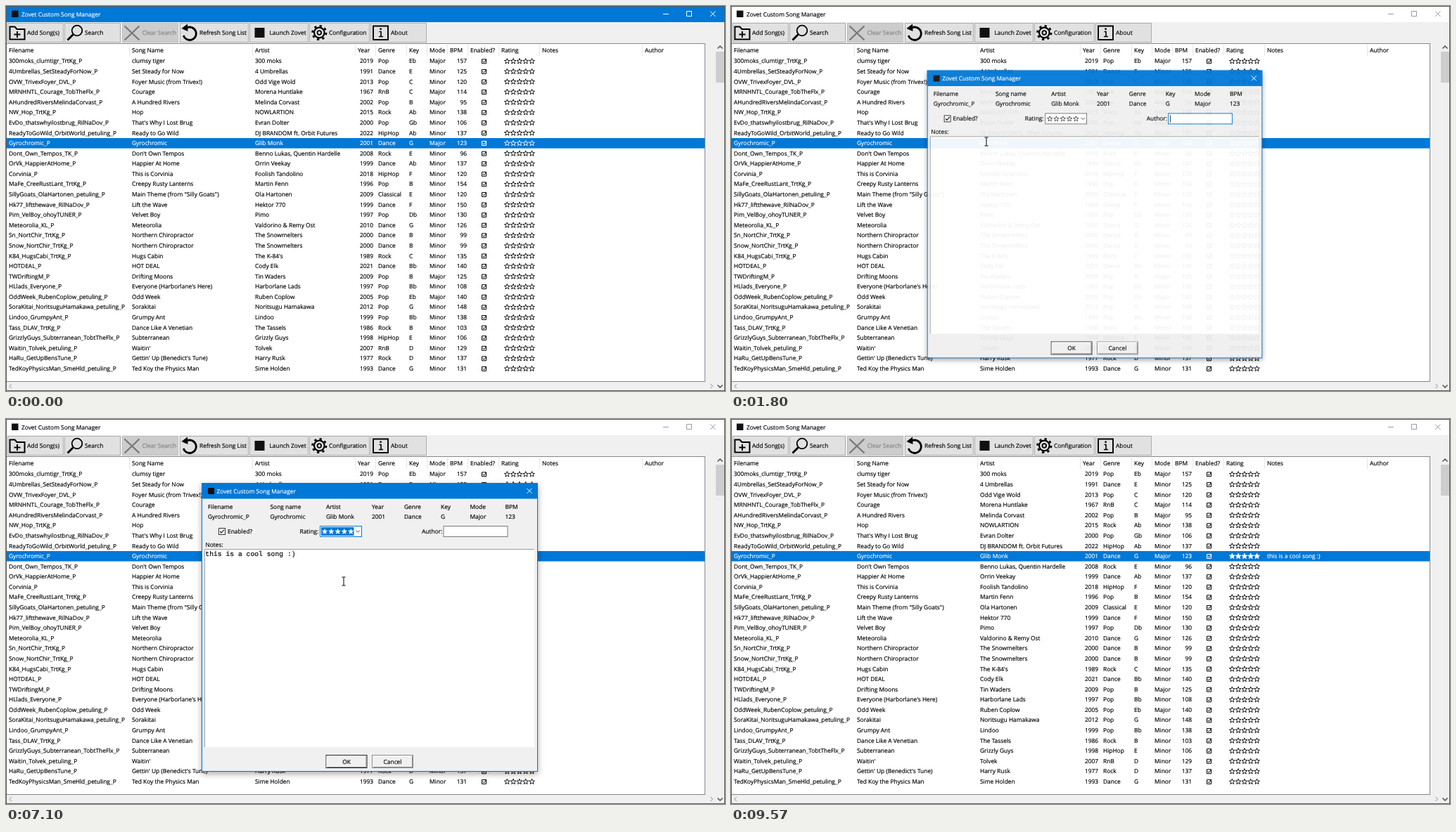
Recreate the animation shown at these times as an HTML page. Size 1022 by 548 pixels, loop 9.71 s.

```html
<!DOCTYPE html>
<html lang="en">
<head>
<meta charset="utf-8">
<title>Custom Song Manager</title>
<style>
  html, body { margin: 0; width: 100%; height: 100%; overflow: hidden; background: #f0f0f0; }
  svg { display: block; width: 100vw; height: 100vh; color: #000; }
  text {
    font: 8.4px "Open Sans", "Noto Sans", sans-serif; white-space: pre; text-rendering: geometricPrecision;
    fill: currentColor; stroke: currentColor; stroke-width: .17px;
  }
  #typed { font: 9.73px "Liberation Mono", monospace; }
  #dialog { filter: drop-shadow(0 3px 4px rgba(0, 0, 0, .35)); transform-origin: 517px 295px; }
</style>
</head>
<body>
<svg id="stage" viewBox="0 0 1022 548"></svg>
<script>
const LOOP = 9710, BLUE = '#0078d7', APP = 'Zovet Custom Song Manager';
const ROW_H = 14.587, PICKED = 8, NOTE = 'this is a cool song :)';

const SONGS = `300moks_clumtigr_TrtKg_P|clumsy tiger|300 moks|2019|Pop|Eb|Major|157
4Umbrellas_SetSteadyForNow_P|Set Steady for Now|4 Umbrellas|1991|Dance|E|Minor|125
OVW_TrivexFoyer_DVL_P|Foyer Music (from Trivex!)|Odd Vige Wold|2013|Pop|C|Minor|120
MRNHNTL_Courage_TobTheFlx_P|Courage|Morena Huntlake|1967|RnB|C|Major|114
AHundredRiversMelindaCorvast_P|A Hundred Rivers|Melinda Corvast|2002|Pop|B|Major|95
NW_Hop_TrtKg_P|Hop|NOWLARTION|2015|Rock|Ab|Minor|138
EvDo_thatswhyilostbrug_RilNaDov_P|That's Why I Lost Brug|Evran Dolter|2000|Pop|Gb|Minor|106
ReadyToGoWild_OrbitWorld_petuling_P|Ready to Go Wild|DJ BRANDOM ft. Orbit Futures|2022|HipHop|Ab|Minor|137
Gyrochromic_P|Gyrochromic|Glib Monk|2001|Dance|G|Major|123
Dont_Own_Tempos_TK_P|Don't Own Tempos|Benno Lukas, Quentin Hardelle|2008|Rock|E|Minor|96
OrVk_HappierAtHome_P|Happier At Home|Orrin Veekay|1999|Dance|Ab|Minor|137
Corvinia_P|This is Corvinia|Foolish Tandolino|2018|HipHop|F|Minor|120
MaFe_CreeRustLant_TrtKg_P|Creepy Rusty Lanterns|Martin Fenn|1996|Pop|B|Minor|154
SillyGoats_OlaHartonen_petuling_P|Main Theme (from "Silly Goats")|Ola Hartonen|2009|Classical|E|Minor|120
Hk77_liftthewave_RilNaDov_P|Lift the Wave|Hektor 770|1999|Dance|F|Minor|150
Pim_VelBoy_ohoyTUNER_P|Velvet Boy|Pimo|1997|Pop|Db|Minor|130
Meteorolia_KL_P|Meteorolia|Valdorino & Remy Ost|2010|Dance|G|Minor|126
Sn_NortChir_TrtKg_P|Northern Chiropractor|The Snowmelters|2000|Dance|B|Minor|99
Snow_NortChir_TrtKg_P|Northern Chiropractor|The Snowmelters|2000|Dance|B|Minor|99
K84_HugsCabi_TrtKg_P|Hugs Cabin|The K-84's|1989|Rock|C|Minor|135
HOTDEAL_P|HOT DEAL|Cody Elk|2021|Dance|Bb|Minor|140
TWDriftingM_P|Drifting Moons|Tin Waders|2009|Pop|B|Major|125
HLlads_Everyone_P|Everyone (Harborlane's Here)|Harborlane Lads|1997|Pop|Bb|Minor|108
OddWeek_RubenCoplow_petuling_P|Odd Week|Ruben Coplow|2005|Pop|Eb|Major|140
SoraKitai_NoritsuguHamakawa_petuling_P|Sorakitai|Noritsugu Hamakawa|2012|Pop|G|Minor|148
Lindoo_GrumpyAnt_P|Grumpy Ant|Lindoo|1999|Pop|Bb|Minor|138
Tass_DLAV_TrtKg_P|Dance Like A Venetian|The Tassels|1986|Rock|B|Minor|103
GrizzlyGuys_Subterranean_TobtTheFlx_P|Subterranean|Grizzly Guys|1998|HipHop|E|Minor|106
Waitin_Tolvek_petuling_P|Waitin'|Tolvek|2007|RnB|D|Minor|129
HaRu_GetUpBensTune_P|Gettin' Up (Benedict's Tune)|Harry Rusk|1977|Rock|D|Minor|137
TedKoyPhysicsMan_SmeHld_petuling_P|Ted Koy the Physics Man|Sime Holden|1993|Dance|G|Minor|131`
  .split('\n').map(line => line.split('|'));

// ---- markup helpers ----
const text = (x, y, s, attrs = '') =>
  `<text x="${x}" y="${y}" ${attrs}>${s.replace(/&/g, '&amp;')}</text>`;
const rect = (x, y, w, h, fill, attrs = '') =>
  `<rect x="${x}" y="${y}" width="${w}" height="${h}" fill="${fill}" ${attrs}/>`;
const box = (x, y, w, h, fill, line, attrs = '') =>
  rect(x + .5, y + .5, w - 1, h - 1, fill, `stroke="${line}" ${attrs}`);
const path = (d, stroke, width = 1, attrs = '') =>
  `<path d="${d}" fill="none" stroke="${stroke}" stroke-width="${width}" ${attrs}/>`;
const circle = (x, y, r, width, attrs = '') =>
  `<circle cx="${x}" cy="${y}" r="${r}" fill="none" stroke="#000" stroke-width="${width}" ${attrs}/>`;

function star(cx, cy, r) {
  let d = '';
  for (let i = 0; i < 10; i++) {
    const a = (i / 5 - .5) * Math.PI, k = i % 2 ? r * .42 : r;
    d += (i ? 'L' : 'M') + (cx + k * Math.cos(a)).toFixed(2) + ' ' + (cy + k * Math.sin(a)).toFixed(2);
  }
  return d + 'Z';
}
function stars(x, y, step, r, filled, color, width) {
  let s = '';
  for (let i = 0; i < 5; i++)
    s += `<path d="${star(x + i * step, y, r)}" fill="${i < filled ? color : 'none'}" stroke="${color}" stroke-width="${width}"/>`;
  return s;
}

// ---- main window ----
function titleBar() {
  return rect(0, 0, 1022, 23, BLUE, 'id="bar"') + rect(8, 6.5, 9.5, 9.5, '#111') +
    text(22, 14.7, APP, 'id="caption"') +
    path('M934 11.5h8M967.5 7.5h7v7h-7zM1001 7.5l7.5 7.5M1001 15l7.5-7.5', '#fff', 1, 'id="controls"');
}

function toolbar() {
  const buttons = [[2, 80, 30, 'Add Song(s)'], [83, 80, 112, 'Search'], [165, 80, 193.5, 'Clear Search'],
    [247, 98, 275, 'Refresh Song List'], [346, 84, 374.5, 'Launch Zovet'], [431, 86, 459, 'Configuration'],
    [518, 80, 547, 'About']];
  let s = rect(0, 23, 1022, 525, '#f0f0f0');
  buttons.forEach(([x, w, tx, label], i) => {
    const off = i === 2;
    s += box(x, 24, w, 28, off ? '#ccc' : '#e1e1e1', off ? '#bfbfbf' : '#adadad') +
      text(tx, 41, label, off ? 'color="#838383"' : '');
  });
  return s +
    path('M5.5 47.5v-18h7l3 3.5h11v14.5z', '#000', 2) + path('M11.5 40.5h9M16 36v9', '#000', 2) +
    circle(101, 35, 7.3, 1.8) + path('M95.5 40.5L87.5 48.5', '#000', 3) +
    path('M168.5 28.5l21 20M168.5 48.5l21-20', '#777', 2.2) +
    path('M257 31A9.2 9.2 0 1 1 252.3 42', '#000', 2.8) + '<path d="M249.5 32L258 25.5L258.5 36Z"/>' +
    rect(353.5, 31, 14, 14, '#111') +
    circle(445.3, 38, 7.3, 2.2) + circle(445.3, 38, 9.7, 2.8, 'stroke-dasharray="3.2 4.418"') + circle(445.3, 38, 2.8, 1.8) +
    path('M522 28.5h21v19.5h-21z', '#000', 1.9) +
    path('M530.5 36.5h2.5v7M530 43.5h6', '#000', 1.6) + rect(531.4, 31.5, 2.4, 2.4, '#000');
}

function songList() {
  const cols = [4, 179, 354, 503, 529, 573, 602, 655];
  let s = box(0, 53, 994, 482, '#fff', '#828790');
  [[4, 'Filename'], [179, 'Song Name'], [354, 'Artist'], [500, 'Year'], [529, 'Genre'], [573, 'Key'], [602, 'Mode'],
    [631, 'BPM'], [660, 'Enabled?'], [704, 'Rating'], [762, 'Notes'], [908, 'Author']].forEach(([x, label]) => {
      s += text(x, 65.5, label);
      if (x > 4) s += rect(x - 4, 55, 1, 16, '#e5e5e5');
    });
  SONGS.forEach((song, i) => {
    const y = 78.4 + i * ROW_H, picked = i === PICKED, color = picked ? '#fff' : '#000';
    if (picked) s += rect(1, Math.round(y - 7.2), 992, ROW_H, BLUE);
    s += `<g color="${color}">` + song.map((v, c) => text(cols[c], y + 3, v, c === 7 ? 'text-anchor="end"' : '')).join('') + '</g>';
    s += path(`M676.5 ${y - 2.6}h6v6h-6zM677.8 ${y + .3}l1.5 1.7l3.5-4.7`, color);
    s += picked ? `<g id="rated">${stars(712.3, y + .3, 8.8, 4.1, 0, color, .9)}</g>` +
      text(762, y + 3, NOTE, 'id="noted" color="#fff"') : stars(712.3, y + .3, 8.8, 4.1, 0, color, .9);
  });
  return s + rect(1009, 65, 12, 44, '#cdcdcd') +
    path('M1011.5 60.5l3.5-3.5l3.5 3.5M1011.5 539.5l3.5 3.5l3.5-3.5', '#444', 1.4) +
    path('M8 538l-3 3l3 3M1001.5 538l3 3l-3 3', '#b0b0b0', 1.1) +
    box(0, 0, 1022, 548, 'none', '#555');
}

// ---- edit dialog ----
function dialog() {
  const [file, name, artist, year, genre, key, mode, bpm] = SONGS[PICKED];
  const info = [[287, 'Filename', file], [375.5, 'Song name', name], [455, 'Artist', artist], [520, 'Year', year],
    [566, 'Genre', genre], [618, 'Key', key], [659.5, 'Mode', mode], [709.5, 'BPM', bpm]];
  const button = (x, label, line) => box(x, 478, 59, 19, '#f0f0f0', line) +
    path(`M${x + 1.5} 496v-16.5h56`, '#fff') + path(`M${x + 2} 495.5h55.5v-16`, '#888') +
    text(x + 29.5, 491, label, 'text-anchor="middle"');
  let menu = box(446, 167, 60, 74, '#fff', BLUE) + rect(447, 168, 58, 12, BLUE, 'id="hover"');
  for (let i = 0; i < 6; i++) menu += `<g class="option">${stars(453, 174 + i * 12, 9.3, 3.9, i, 'currentColor', .7)}</g>`;
  return '<g id="dialog">' + box(278, 91, 478, 411, '#f0f0f0', BLUE) + rect(278, 91, 478, 22.5, BLUE) +
    rect(287, 98, 9, 9, '#111') + text(299.5, 105.5, APP, 'color="#fff"') +
    path('M740.5 98.8l7 7M740.5 105.8l7-7', '#fff') +
    info.map(([x, a, b]) => text(x, 127.5, a) + text(x, 141.5, b)).join('') +
    box(302, 155, 10, 10, '#fff', '#333') + path('M304.3 160l2 2l3.7-4.5', '#000', 1.1) +
    text(315, 163, 'Enabled?') + text(417.5, 163, 'Rating:') +
    box(446, 152, 60, 16, '#fff', '#7a7a7a', 'id="combo"') + rect(448, 154, 46.5, 12, BLUE, 'id="comboFocus"') +
    path('M497.5 158.5l2.7 2.7l2.7-2.7', '#444') +
    `<g id="empty">${stars(453, 160.3, 9.3, 3.9, 0, '#111', .7)}</g>` +
    `<g id="full">${stars(453, 160.3, 9.3, 3.9, 5, '#fff', .5)}</g>` +
    text(591, 163, 'Author:') + box(621.5, 152, 92, 16, '#fff', '#7a7a7a', 'id="author"') +
    rect(624.3, 155, .8, 10, '#000', 'id="authorCaret"') +
    text(283.5, 181.5, 'Notes:') + rect(282, 185, 469, 282, '#fff') + path('M282.5 467v-281.5h468.5', '#a0a0a0') +
    text(283.3, 195.2, '', 'id="typed"') + rect(283, 187, 1.3, 10.5, '#000', 'id="caret"') +
    button(454.5, 'OK', '#222') + button(520, 'Cancel', '#8a8a8a') +
    `<g id="menu">${menu}</g></g>`;
}

const pointers =
  '<path id="arrow" d="M0 0V11.6L2.6 9.2L4.4 13.2L6.1 12.4L4.4 8.5H8Z" fill="#fff" stroke="#000" stroke-width=".8"/>' +
  path('M-2.5 -6h2q.5 0 .5 .6q0 -.6 .5 -.6h2M-2.5 6h2q.5 0 .5 -.6q0 .6 .5 .6h2M0 -5.5v11', '#000', 1, 'id="beam"');

document.getElementById('stage').innerHTML = toolbar() + titleBar() + songList() + dialog() + pointers;
const el = {};
document.querySelectorAll('[id]').forEach(n => el[n.id] = n);
const options = [...document.querySelectorAll('.option')];
const rowStars = [...el.rated.children];

// ---- motion ----
const PATH = [[200, 962, 293], [1100, 362, 193], [1800, 363, 193], [2370, 472, 219], [5570, 472, 219],
  [6060, 503, 159], [6260, 503, 159], [6560, 497, 187], [6900, 480, 231], [7100, 480, 231],
  [7970, 494.5, 487.5], [8730, 494.5, 487.5], [9330, 64, 550]];
const KEYS = [2900, 2970, 3030, 3100, 3270, 3300, 3360, 3430, 3570, 3630, 3800,
  3870, 3930, 4170, 4230, 4300, 4370, 4430, 4500, 4600, 4770, 4970];

const within = (t, a, b) => t >= a && t < b;
const clamp = v => Math.max(0, Math.min(1, v));
const show = (node, on) => node.setAttribute('visibility', on ? 'inherit' : 'hidden');
const set = (node, name, v) => node.setAttribute(name, v);

function pointerAt(t) {
  const i = PATH.findIndex(p => p[0] > t);
  if (i < 1) return PATH[i < 0 ? PATH.length - 1 : 0].slice(1);
  const [t0, x0, y0] = PATH[i - 1], [t1, x1, y1] = PATH[i];
  const p = (t - t0) / (t1 - t0), e = p * p * (3 - 2 * p);
  return [x0 + (x1 - x0) * e, y0 + (y1 - y0) * e];
}

function draw(t) {
  const active = !within(t, 1630, 8120) && t < 9570;
  set(el.bar, 'fill', active ? BLUE : '#fff');
  set(el.caption, 'color', active ? '#fff' : '#000');
  set(el.controls, 'stroke', active ? '#fff' : '#999');

  const saved = t >= 8360;
  rowStars.forEach(s => set(s, 'fill', saved ? '#fff' : 'none'));
  show(el.noted, saved);

  const open = 1 - (1 - clamp((t - 1650) / 200)) ** 2;
  const shown = t < 8000 ? open : 1 - clamp((t - 8120) / 200);
  show(el.dialog, shown > 0);
  el.dialog.style.opacity = shown;
  el.dialog.style.transform = shown < 1 ? `scale(${.95 + .05 * shown})` : 'none';

  const authorFocus = t < 2370, menuOpen = within(t, 6130, 7100), rated = t >= 7100;
  set(el.author, 'stroke', authorFocus ? BLUE : '#7a7a7a');
  show(el.authorCaret, authorFocus);
  set(el.combo, 'stroke', t >= 6130 ? BLUE : '#7a7a7a');
  show(el.comboFocus, rated);
  show(el.full, rated);
  show(el.empty, !rated);

  const count = KEYS.filter(k => k <= t).length;
  el.typed.textContent = NOTE.slice(0, count);
  set(el.caret, 'x', 283 + count * 5.838);
  show(el.caret, within(t, 2370, 3100) || within(t, 3300, 4830) || within(t, 5130, 5570));

  const [x, y] = pointerAt(t);
  const hovered = Math.max(0, Math.min(5, Math.floor((y - 168) / 12)));
  show(el.menu, menuOpen);
  set(el.hover, 'y', 168 + hovered * 12);
  options.forEach((o, i) => o.style.color = i === hovered ? '#fff' : '#111');

  const visible = within(t, 200, 9330);
  const beam = within(t, 1700, 8120) && y > 185 && y < 467 && !menuOpen;
  show(el.arrow, visible && !beam);
  show(el.beam, visible && beam);
  for (const p of [el.arrow, el.beam]) set(p, 'transform', `translate(${x} ${y})`);
}

const start = performance.now();
function tick() {
  draw((performance.now() - start) % LOOP);
  requestAnimationFrame(tick);
}
tick();
</script>
</body>
</html>
```
